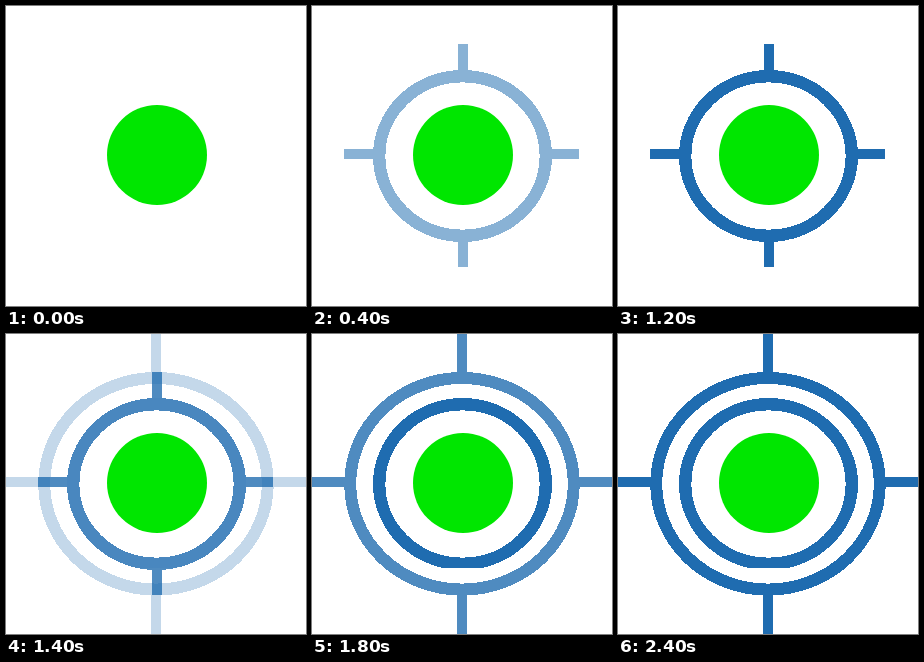
Write an HTML page that moves like this. It is 300 by 300 pixels and loops after 2500 ms.

```html
<!DOCTYPE html>
<html lang="en">
<head>
<meta charset="utf-8">
<title>Target rings</title>
<style>
  html, body { margin: 0; width: 100%; height: 100%; overflow: hidden; background: #fff; }
  svg { display: block; width: 100%; height: 100%; }
  .blue { fill: none; stroke: #1f6cb0; shape-rendering: crispEdges; opacity: 0; }
</style>
</head>
<body>
<svg viewBox="0 0 300 300">
  <defs>
    <ellipse id="ring" cx="150.5" cy="150" rx="83.3" ry="79.8" stroke-width="12.4"/>
    <clipPath id="flat"><rect width="300" height="234"/></clipPath>
  </defs>
  <g id="outer" class="blue">
    <ellipse cx="150" cy="149.8" rx="111.8" ry="105.8" stroke-width="12"/>
    <path d="M150 0V44M150 256V300M0 147.5H38M262 147.5H300" stroke-width="10"/>
  </g>
  <g id="inner" class="blue"><use href="#ring" clip-path="url(#flat)"/></g>
  <g id="sight" class="blue">
    <use href="#ring"/>
    <path d="M150.5 38V76M150.5 224V261M32 147.5H67M234 147.5H267" stroke-width="10"/>
  </g>
  <circle cx="151" cy="149" r="50" fill="#00e600"/>
</svg>
<script>
  const LOOP = 2500, HALF = 1200;
  const fade = [0, 0.13, 0.26, 0.39, 0.52, 0.655, 0.785, 0.9, 1];
  const [outer, inner, sight] = ["outer", "inner", "sight"].map(id => document.getElementById(id));

  // Six quick steps of 100 ms, then two slow ones of 300 ms.
  const stepAt = t => t < 600 ? Math.floor(t / 100) : 4 + Math.floor(t / 300);

  function draw(now) {
    const t = now % LOOP;
    const first = fade[Math.min(8, stepAt(t))];
    const step = t < HALF ? 0 : Math.min(8, stepAt(t - HALF));
    const swap = Math.min(1, step / 6);
    outer.style.opacity = fade[step];
    inner.style.opacity = swap ** 2;
    sight.style.opacity = first * (1 - swap ** 1.4);
    requestAnimationFrame(draw);
  }
  draw(0);
</script>
</body>
</html>
```
